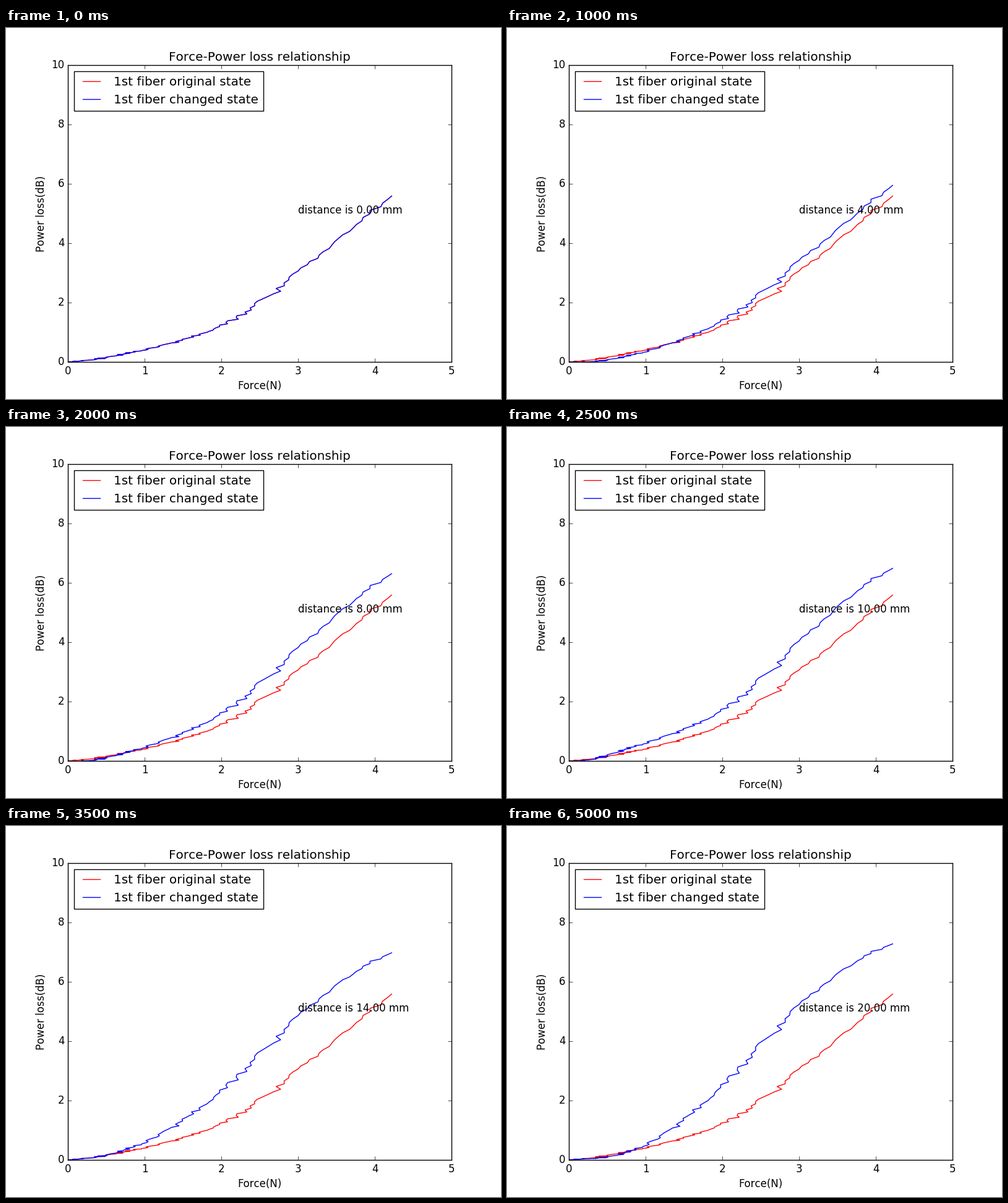
Recreate the animation shown at these times as a matplotlib script. Size 800 by 600 pixels, loop 5.5 s.

```python
import numpy as np
import matplotlib.pyplot as plt
from matplotlib.animation import FuncAnimation

plt.style.use("classic")
plt.rcParams["text.kerning_factor"] = 6  # whole-pixel kerning

SAMPLES = 113
STEP_MM = 2
FRAMES = 11

# Extra loss in dB at a few points of the press, for some distances in mm.
KEY_T = (0, 0.2, 0.45, 0.7, 0.9, 1)
EXTRA = {
    0: (0, 0, 0, 0, 0, 0),
    6: (0, -0.13, 0.05, 0.42, 0.58, 0.54),
    10: (0, 0.08, 0.31, 0.73, 1.11, 0.90),
    14: (0, 0.03, 0.56, 1.54, 1.79, 1.39),
    18: (0, 0.02, 0.71, 1.81, 1.92, 1.45),
    20: (0, -0.05, 0.57, 1.85, 2.16, 1.69),
}

t = np.linspace(0, 1, SAMPLES)


def noisy_force():
    """Accelerating press with sensor jitter, exact at both ends."""
    jitter = np.random.default_rng(4).normal(0, 0.03, SAMPLES)
    jitter[[0, -1]] = 0
    trend = 3.18 * t - 0.56 * t**2 + 1.6 * t**3
    return np.maximum(trend + jitter, 0)


def base_loss():
    """Slow rise that bends into a steep straight line."""
    knee, width, slope = 0.677, 0.08, 10.6
    bend = slope * width * np.logaddexp(0, (t - knee) / width)
    return 2.15 * t**1.46 + bend


def extra_loss(distance):
    """Smooth curve through the key values blended for this distance."""
    keys = [np.interp(distance, list(EXTRA), column)
            for column in zip(*EXTRA.values())]
    return np.polynomial.Polynomial.fit(KEY_T, keys, len(KEY_T) - 1)(t)


force = noisy_force()
base = base_loss()

fig = plt.figure(figsize=(8, 6), dpi=100, facecolor="white")
ax = fig.add_subplot(111)
ax.plot(force, base, "r", label="1st fiber original state")
changed, = ax.plot(force, base, "b", label="1st fiber changed state")
note = ax.text(3, 5, "")

ax.set_xlim(0, 5)
ax.set_ylim(0, 10)
ax.set_title("Force-Power loss relationship")
ax.set_xlabel("Force(N)")
ax.set_ylabel("Power loss(dB)")
ax.legend(loc="upper left")


def update(i):
    distance = i * STEP_MM
    changed.set_ydata(base + extra_loss(distance))
    note.set_text(f"distance is {distance:.2f} mm")
    return changed, note


anim = FuncAnimation(fig, update, frames=FRAMES, interval=500, repeat=True)
plt.show()
```
